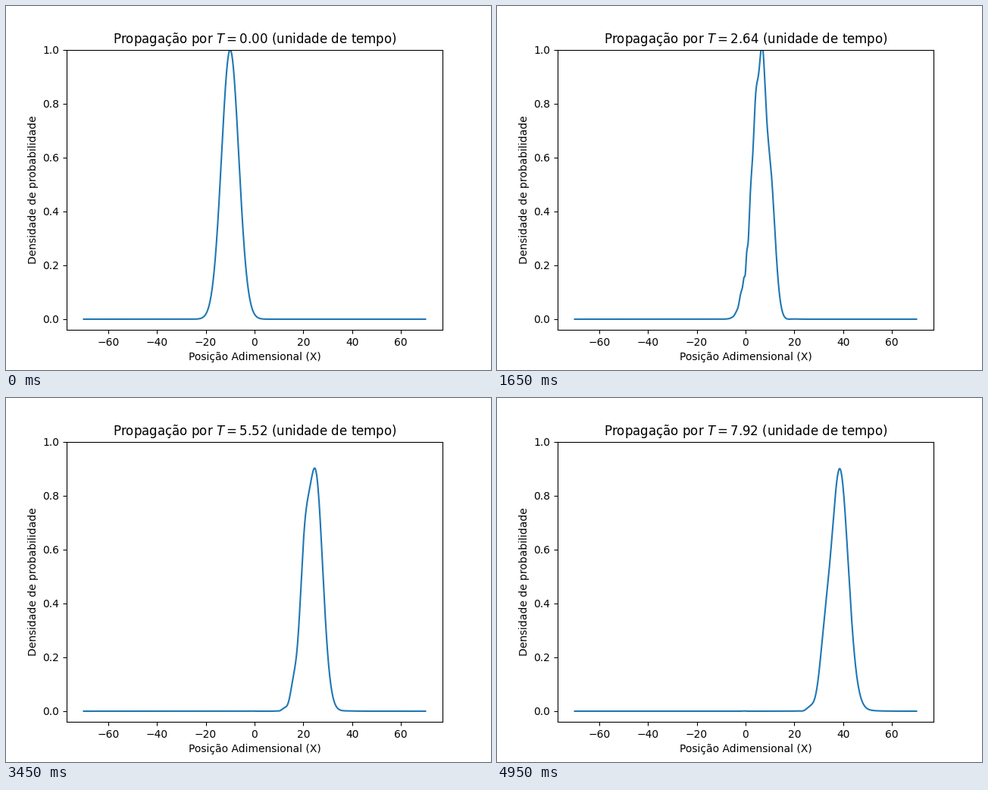
Animation of 640x480 px, one loop 5000 ms. Source, as a matplotlib script:

```python
import numpy as np
import matplotlib.pyplot as plt
from matplotlib.animation import FuncAnimation

FRAMES = 100
INTERVAL = 50       # ms
DT = 0.08           # dimensionless time per frame
SUBSTEPS = 16
X0, K0, WIDTH = -10.0, 3.0, 5.0

x = np.linspace(-70, 70, 1001)
dx = x[1] - x[0]
k = 2 * np.pi * np.fft.fftfreq(x.size, dx)

# Reflectionless well crossed by the packet: i psi_t = -psi_xx + V psi
well = -6 / np.cosh(x) ** 2


def propagate():
    """Probability density at every frame, by the split-step Fourier method."""
    tau = DT / SUBSTEPS
    half_kick = np.exp(-0.5j * tau * well)
    drift = np.exp(-1j * tau * k ** 2)
    psi = np.exp(-(x - X0) ** 2 / (2 * WIDTH ** 2) + 1j * K0 * x)
    densities = []
    for _ in range(FRAMES):
        densities.append(np.abs(psi) ** 2)
        for _ in range(SUBSTEPS):
            psi = half_kick * np.fft.ifft(drift * np.fft.fft(half_kick * psi))
    return densities


densities = propagate()

fig, ax = plt.subplots(figsize=(6.4, 4.8), dpi=100)
line, = ax.plot(x, densities[0], color="#1f77b4", lw=1.5)
ax.set_ylim(-0.04, 1.0)
ax.set_xlabel("Posição Adimensional (X)")
ax.set_ylabel("Densidade de probabilidade")
title = ax.set_title("")


def update(i):
    line.set_ydata(densities[i])
    title.set_text(f"Propagação por $T={i * DT:.2f}$ (unidade de tempo)")
    return line, title


anim = FuncAnimation(fig, update, frames=FRAMES, interval=INTERVAL,
                     repeat=True, repeat_delay=0, blit=False)
plt.show()
```
